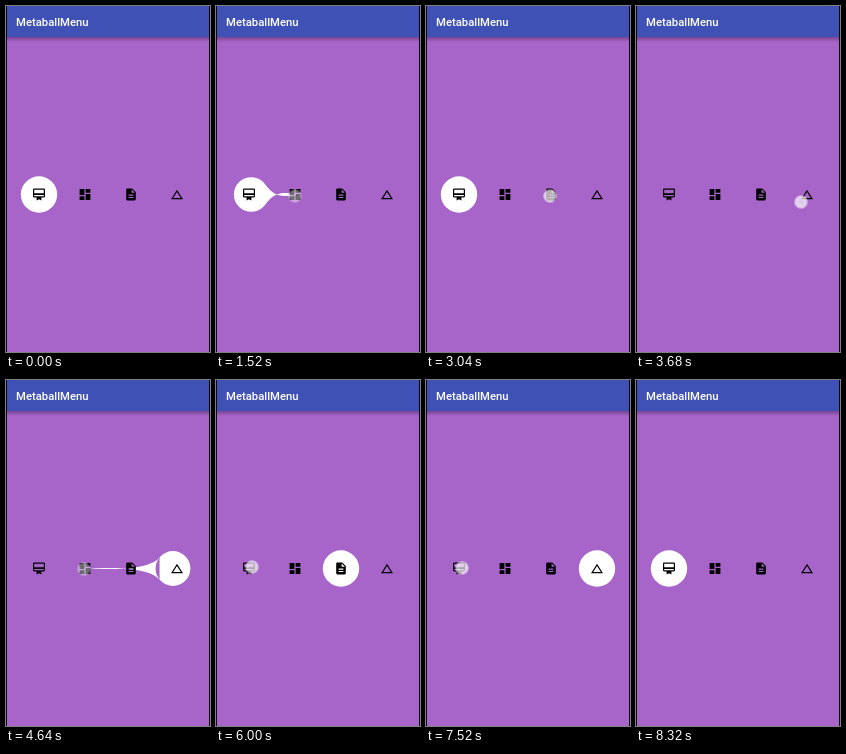
Recreate the animation shown at these times as an HTML page. Size 204 by 346 pixels, loop 8.64 s.

```html
<!DOCTYPE html>
<html lang="en">
<head>
<meta charset="utf-8">
<title>MetaballMenu</title>
<style>
  html, body { margin: 0; width: 100%; height: 100%; overflow: hidden; background: #a765c9; }
  .screen { position: relative; width: 204px; height: 346px; overflow: hidden; background: #a765c9; }
  .bar {
    position: absolute; inset: 0 0 auto; height: 31px; box-sizing: border-box;
    padding-left: 10px; background: #3f51b5; color: #fff;
    font: 500 11.3px/33px Roboto, sans-serif;
  }
  .bar::after {
    content: ""; position: absolute; left: 0; right: 0; top: 31px; height: 5px;
    background: linear-gradient(rgba(40, 10, 60, .38), rgba(40, 10, 60, 0));
  }
  .edge { position: absolute; top: 0; bottom: 0; width: 1px; background: #08060c; }
  svg { position: absolute; left: 0; top: 0; }
</style>
</head>
<body>
<div class="screen">
  <div class="bar">MetaballMenu</div>
  <svg width="204" height="346" viewBox="0 0 204 346">
    <defs>
      <radialGradient id="glow">
        <stop offset="0" stop-color="#fff" stop-opacity=".62"/>
        <stop offset=".6" stop-color="#fff" stop-opacity=".72"/>
        <stop offset=".78" stop-color="#fff" stop-opacity=".6"/>
        <stop offset="1" stop-color="#fff" stop-opacity="0"/>
      </radialGradient>
    </defs>
    <path id="blob" fill="#fff"/>
    <g id="icons" fill="#000">
      <path d="M20 2H4c-1.11 0-2 .89-2 2v11c0 1.11.89 2 2 2h4v5l4-2 4 2v-5h4c1.11 0 2-.89 2-2V4c0-1.11-.89-2-2-2zm0 13H4v-2h16v2zm0-5H4V4h16v6z"/>
      <path d="M3 13h8V3H3v10zm0 8h8v-6H3v6zm10 0h8V11h-8v10zm0-18v6h8V3h-8z"/>
      <path d="M14 2H6c-1.1 0-2 .9-2 2v16c0 1.1.9 2 2 2h12c1.1 0 2-.9 2-2V8l-6-6zm2 16H8v-2h8v2zm0-4H8v-2h8v2zm-3-5V3.5L18.5 9H13z"/>
      <path d="M12 7.77L18.39 18H5.61L12 7.77M12 4L2 20h20L12 4z"/>
    </g>
    <circle id="touch" r="7.4" fill="url(#glow)"/>
  </svg>
  <i class="edge" style="left:0"></i>
  <i class="edge" style="right:0"></i>
</div>
<script>
  const LOOP = 8640, STEP = 80, MOVE = 500, TOUCH = 240;
  const R = 18.2, Y = 188.5;
  const itemX = i => 33 + 46 * i;

  // press: finger down, start: blob leaves, x/y: finger position
  const moves = [
    { press: 1360, start: 1450, from: 0, to: 1, x: 79, y: 190 },
    { press: 2160, start: 2262, from: 1, to: 0, x: 38, y: 188 },
    { press: 2960, start: 3040, from: 0, to: 2, x: 124, y: 190 },
    { press: 3680, start: 3750, from: 2, to: 3, x: 165, y: 196, blink: true },
    { press: 4480, start: 4573, from: 3, to: 1, x: 78, y: 189 },
    { press: 5200, start: 5320, from: 1, to: 2, x: 124, y: 190 },
    { press: 6000, start: 6060, from: 2, to: 0, x: 36, y: 187 },
    { press: 6720, start: 6781, from: 0, to: 3, x: 166, y: 193 },
    { press: 7440, start: 7550, from: 3, to: 0, x: 36, y: 188 }
  ];

  const blob = document.getElementById('blob');
  const touch = document.getElementById('touch');
  [...document.getElementById('icons').children].forEach((icon, i) =>
    icon.setAttribute('transform', `translate(${itemX(i)} ${Y}) scale(.6) translate(-12 -12)`));

  const clamp = v => Math.max(0, Math.min(1, v));
  const arcCos = v => Math.acos(Math.max(-1, Math.min(1, v)));
  const pt = (x, y) => `${x.toFixed(2)} ${y.toFixed(2)}`;

  const disc = (x, r) => r < 0.05 ? '' :
    `M${pt(x - r, Y)}a${r} ${r} 0 1 1 ${2 * r} 0a${r} ${r} 0 1 1 ${-2 * r} 0z`;

  // Skin between two discs on the same line; its two edges may cross.
  function bridge(x1, r1, x2, r2) {
    const d = Math.abs(x2 - x1), sum = r1 + r2, dir = Math.sign(x2 - x1);
    if (r1 < 0.05 || r2 < 0.05 || d <= Math.abs(r1 - r2)) return '';
    const overlap = d < sum;
    const u1 = overlap ? arcCos((r1 * r1 + d * d - r2 * r2) / (2 * r1 * d)) : 0;
    const u2 = overlap ? arcCos((r2 * r2 + d * d - r1 * r1) / (2 * r2 * d)) : 0;
    const tangent = arcCos((r1 - r2) / d);
    const a = u1 + (tangent - u1) / 2;
    const b = Math.PI - u2 - (Math.PI - u2 - tangent) / 2;
    const p = [r1 * Math.cos(a), r1 * Math.sin(a)];
    const q = [d + r2 * Math.cos(b), r2 * Math.sin(b)];
    const gap = Math.hypot(q[0] - p[0], q[1] - p[1]);
    const h = Math.min(1.2, gap / sum) * Math.min(1, 2 * d / sum);
    const pc = [p[0] + h * r1 * Math.sin(a), p[1] - h * r1 * Math.cos(a)];
    const qc = [q[0] - h * r2 * Math.sin(b), q[1] + h * r2 * Math.cos(b)];
    const at = (v, side) => pt(x1 + dir * v[0], Y + side * v[1]);
    return `M${at(p, -1)}C${at(pc, -1)} ${at(qc, -1)} ${at(q, -1)}` +
      `L${at(q, 1)}C${at(qc, 1)} ${at(pc, 1)} ${at(p, 1)}z`;
  }

  function blobPath(move, t) {
    if (!move) return disc(itemX(0), R);
    if (move.blink && t < move.press + STEP) return '';
    const p = (1 - Math.cos(Math.PI * clamp((t - move.start) / MOVE))) / 2;
    const goal = itemX(move.to);
    const x = itemX(move.from) + (goal - itemX(move.from)) * p;
    const r1 = R * (1 - p), r2 = R * p;
    return disc(x, r1) + disc(goal, r2) + bridge(x, r1, goal, r2);
  }

  function draw(now) {
    const t = Math.floor(now % LOOP / STEP) * STEP;
    const move = moves.filter(m => m.press <= t).pop();
    blob.setAttribute('d', blobPath(move, t));
    const age = move ? t - move.press : TOUCH;
    touch.setAttribute('opacity', clamp((TOUCH - age) / 130));
    if (move) {
      touch.setAttribute('cx', move.x);
      touch.setAttribute('cy', move.y);
    }
  }

  const begin = performance.now();
  function tick() {
    draw(performance.now() - begin);
    requestAnimationFrame(tick);
  }
  tick();
</script>
</body>
</html>
```
